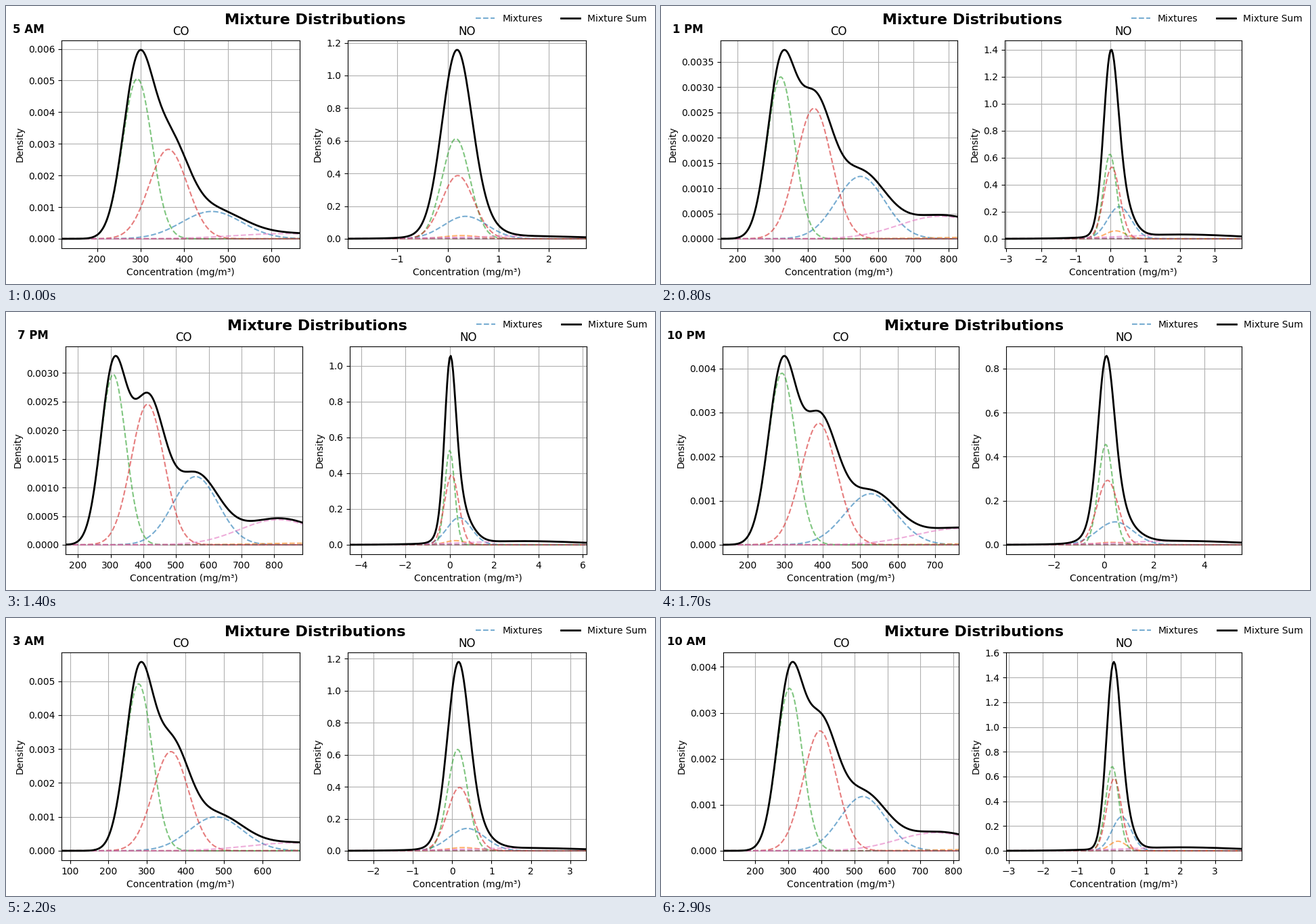
Write a matplotlib script that moves like this. It is 959 px wide and 412 px high and loops after 3 s.

```python
import numpy as np
import matplotlib.pyplot as plt
from matplotlib.animation import FuncAnimation

W, H, DPI = 959, 412, 100
FRAMES, INTERVAL = 30, 100
START_HOUR = 5
ROOT = np.sqrt(2 * np.pi)

# View at a few hours after the start: x min, x max and peak of each panel.
HOURS = np.array([0, 5, 10, 14, 17, 22, 29])
CO_VIEW = np.array([
    [118.5, 119.2, 169, 161.7, 134, 78, 103.6],
    [665, 744.3, 868, 886, 763, 696.7, 816.4],
    [5.97e-3, 4.77e-3, 3.237e-3, 3.3e-3, 4.283e-3, 5.567e-3, 4.11e-3],
])
NO_VIEW = np.array([
    [-1.98, -2.22, -3.65, -4.52, -3.92, -2.66, -3.07],
    [2.73, 2.66, 4.66, 6.17, 5.5, 3.4, 3.78],
    [1.157, 1.444, 1.31, 1.055, 0.858, 1.181, 1.526],
])


def smooth(view, t):
    """Cubic Hermite interpolation along the hours."""
    slope = np.gradient(view, HOURS, axis=1)
    i = min(np.searchsorted(HOURS, t, side="right") - 1, len(HOURS) - 2)
    step = HOURS[i + 1] - HOURS[i]
    u = (t - HOURS[i]) / step
    ease = u * u * (3 - 2 * u)
    return ((1 - ease) * view[:, i] + ease * view[:, i + 1]
            + step * u * (1 - u) * ((1 - u) * slope[:, i] - u * slope[:, i + 1]))


def daily(t, mean, swing, peak_hour, drift=0):
    """Daily cycle with a slow drift per day."""
    angle = 2 * np.pi * (START_HOUR + t - peak_hour) / 24
    return mean + swing * np.cos(angle) + drift * t / 24


def curves(view, parts):
    """Weighted normal curves, scaled so that their sum has the view's peak."""
    lo, hi, peak = view
    x = np.linspace(lo, hi, 200)
    ys = np.array([w / (s * ROOT) * np.exp(-0.5 * ((x - mu) / s) ** 2)
                   for mu, s, w in parts])
    ys *= peak / ys.sum(axis=0).max()
    return x, ys, peak


def mixtures(t):
    """Components run blue, orange, green, red, purple, brown, pink."""
    green = daily(t, 0.368, 0.075, 4, -0.0285)
    red, blue, pink = 0.32, 0.335 - 0.41 * green, 0.31 - 0.59 * green
    empty = (0, 1, 0)

    mu = daily(t, 307.5, 20, 14.3, -10.4)
    gap = daily(t, 85.5, 14.5, 17.5, 10.4)
    s = daily(t, 36, 2.6, 15.5, 2)
    co = curves(smooth(CO_VIEW, t), [
        (mu + 2.4 * gap, 69, blue), (900, 150, 0.011), (mu, s, green),
        (mu + gap, 1.3 * s, red), empty, empty, (mu + 4.8 * gap, 118, pink)])

    view = lo, hi, peak = smooth(NO_VIEW, t)
    span = hi - lo
    mu = daily(t, 0.075, 0.095, 3.3, -0.035)
    ratio = daily(t, 1.95, 0.55, 20)
    # The peak fixes the width of the narrowest curve.
    s = (green + red / (0.92 * ratio ** 0.5) + 0.8 * blue / ratio) / (ROOT * peak)
    wide = s * ratio
    no = curves(view, [
        (mu + 0.04 * span, wide, blue),
        (mu + 0.024 * span, 0.85 * wide, 0.85 * blue ** 2 / (ROOT * wide)),
        (mu, s, green), (mu + 0.008 * span, 0.92 * (s * wide) ** 0.5, red),
        (-0.3, 0.15 * span, 0.01), empty, (0.55 * hi, 0.42 * hi, pink)])
    return co, no


fig = plt.figure(figsize=(W / DPI, H / DPI), dpi=DPI)
axes, lines, sums = [], [], []
for k, name in enumerate(("CO", "NO")):
    ax = fig.add_axes([0.1 + 0.45 * k, 0.13, 0.36, 0.74])
    ax.set_title(name)
    ax.set_xlabel("Concentration (mg/m³)")
    ax.set_ylabel("Density")
    ax.grid(True)
    lines.append([ax.plot([], [], "--", color=f"C{c}", alpha=0.6)[0]
                  for c in range(7)])
    sums.append(ax.plot([], [], color="black", lw=2)[0])
    axes.append(ax)

title = fig.text(0.5, 1 - 27 / H, "Mixture Distributions", ha="center",
                 va="baseline", weight="bold")
clock = fig.text(0, 1 - 39.5 / H, "", ha="right", va="baseline", weight="bold")
legend = fig.legend([lines[0][0], sums[0]], ["Mixtures", "Mixture Sum"],
                    loc="center", ncol=2, frameon=False, borderaxespad=0)


def place(hour, half, peak):
    """Make room at the left for the widest label, squeezing the rest."""
    shift = (11.2 if hour >= 10 else 0) - (0.7 if half == "PM" else 0)
    if 1.1 * peak <= 0.0045:
        shift = max(shift, 6.3)
    fit = lambda x: (x + shift) / (W + shift)
    for ax, left in zip(axes, (82, 504.73)):
        x0, x1 = fit(left), fit(left + 352.27)
        ax.set_position([x0, 53 / H, x1 - x0, 308 / H])
    title.set_x(fit(457))
    title.set_fontsize(16 * W / (W + shift))
    clock.set_x(fit(56.5))
    clock.set_fontsize(12 * W / (W + shift))
    legend.set_bbox_to_anchor((fit(820.7), 1 - 19 / H), fig.transFigure)


def update(i):
    day_hour = (START_HOUR + i) % 24
    hour, half = (day_hour - 1) % 12 + 1, "AM" if day_hour < 12 else "PM"
    clock.set_text(f"{hour} {half}")
    data = mixtures(i)
    place(hour, half, data[0][2])
    for ax, parts, total, (x, ys, peak) in zip(axes, lines, sums, data):
        for line, y in zip(parts, ys):
            line.set_data(x, y)
        total.set_data(x, ys.sum(axis=0))
        ax.set_xlim(x[0], x[-1])
        ax.set_ylim(-0.05 * peak, 1.05 * peak)
    return []


anim = FuncAnimation(fig, update, frames=FRAMES, interval=INTERVAL,
                     init_func=lambda: update(0), repeat=True, repeat_delay=0)
plt.show()
```
